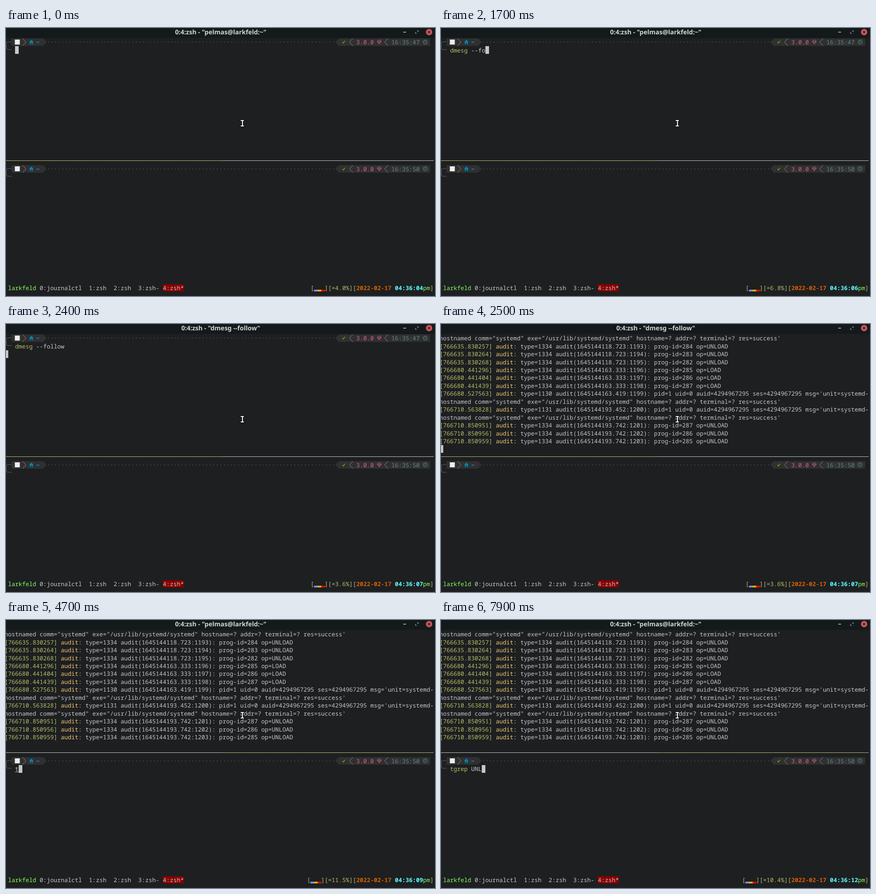
These frames come from a looping animation (947x591 px, 8 s). An HTML page with a canvas:

```html
<!DOCTYPE html>
<html lang="en">
<head>
<meta charset="utf-8">
<title>Terminal</title>
<style>
  html, body { margin: 0; width: 100%; height: 100%; overflow: hidden; background: #1d1f21; }
  canvas { display: block; width: 947px; height: 591px; }
</style>
</head>
<body>
<canvas id="stage" width="947" height="591"></canvas>
<script>
const ctx = document.getElementById('stage').getContext('2d');
const LOOP = 8000, W = 947, H = 591;
const CELL = 7.765, ROW = 17.47, LEFT = -3.3, TOP = 22.6;
const MONO = '12.94px "Noto Sans Mono", monospace';
const SANS = '14px "Noto Sans", sans-serif';
const BG = '#1d1f21', FG = '#c5c8c6', BAR = '#141a1b', SEG = '#303030';
const OLIVE = '#b5bd68', LIME = '#87ff5f', AMBER = '#f0c674', DIM = '#6c6c6c';
const HOST = 'larkfeld', HOME_TITLE = '"pelmas@larkfeld:~"';

// Each track: [start ms, value...]
const TOP_CMD = 'dmesg --follow', LOW_CMD = 'tgrep UNL';
const topTyped = [[0, 0], [300, 1], [400, 2], [500, 3], [600, 4], [700, 5], [800, 6], [1100, 7],
  [1400, 8], [1700, 10], [1900, 11], [2000, 12], [2200, 13], [2300, 14]];
const lowTyped = [[0, 0], [4700, 1], [4800, 2], [5200, 3], [5300, 5], [5400, 6], [7700, 7], [7900, 9]];
const stats = [[0, '4.0', 4], [100, '3.7', 5], [1100, '6.8', 6], [2100, '3.6', 7], [3200, '3.9', 8],
  [3800, '3.9', 9], [4200, '11.5', 9], [4800, '11.5', 10], [5300, '10.7', 10], [6300, '9.4', 11],
  [7300, '10.4', 12]];
const scenes = [[0, 'type'], [1200, 'flash'], [1300, 'type'], [2400, 'run'], [2500, 'log'],
  [3200, 'named'], [3800, 'low']];

const tail = 'hostnamed comm="systemd" exe="/usr/lib/systemd/systemd" hostname=? addr=? terminal=? res=success\'';
const unit = "pid=1 uid=0 auid=4294967295 ses=4294967295 msg='unit=systemd-";
const prog = (id, op) => `prog-id=${id} op=${op}`;
const log = [
  tail,
  ['766635.830257', 1334, '118.723:1193', prog(284, 'UNLOAD')],
  ['766635.830264', 1334, '118.723:1194', prog(283, 'UNLOAD')],
  ['766635.830268', 1334, '118.723:1195', prog(282, 'UNLOAD')],
  ['766680.441296', 1334, '163.333:1196', prog(285, 'LOAD')],
  ['766680.441404', 1334, '163.333:1197', prog(286, 'LOAD')],
  ['766680.441439', 1334, '163.333:1198', prog(287, 'LOAD')],
  ['766680.527563', 1130, '163.419:1199', unit],
  tail,
  ['766710.563828', 1131, '193.452:1200', unit],
  tail,
  ['766710.850951', 1334, '193.742:1201', prog(287, 'UNLOAD')],
  ['766710.850956', 1334, '193.742:1202', prog(286, 'UNLOAD')],
  ['766710.850959', 1334, '193.742:1203', prog(285, 'UNLOAD')]
];

const at = (track, t) => track.findLast(step => step[0] <= t);
const colX = c => LEFT + c * CELL;
const rowY = r => TOP + r * ROW;

function rect(x, y, w, h, color) {
  ctx.fillStyle = color;
  ctx.fillRect(x, y, w, h);
}

function poly(points, color, stroke, close) {
  ctx.beginPath();
  points.forEach(([x, y]) => ctx.lineTo(x, y));
  if (close) ctx.closePath();
  if (stroke) {
    ctx.strokeStyle = color;
    ctx.lineWidth = stroke;
    ctx.stroke();
  } else {
    ctx.fillStyle = color;
    ctx.fill();
  }
}

// Writes on the character grid and returns the next column.
function put(col, row, text, color = FG, bold = false) {
  ctx.font = (bold ? 'bold ' : '') + MONO;
  ctx.fillStyle = color;
  [...text].forEach((ch, i) => {
    if (ch !== ' ') ctx.fillText(ch, colX(col + i), rowY(row) + 13.5);
  });
  return col + text.length;
}

function label(text, x, y, color, bold = false, align = 'left') {
  ctx.font = (bold ? 'bold ' : '') + SANS;
  ctx.fillStyle = color;
  ctx.textAlign = align;
  ctx.fillText(text, x, y);
  ctx.textAlign = 'left';
}

function cursor(col, row) {
  rect(Math.round(colX(col)), Math.round(rowY(row)), 8, 17, FG);
}

function house(x, y, s, color) {
  poly([[x, y + s * .5], [x + s * .5, y], [x + s, y + s * .5], [x + s * .84, y + s * .5],
    [x + s * .84, y + s], [x + s * .6, y + s], [x + s * .6, y + s * .65], [x + s * .4, y + s * .65],
    [x + s * .4, y + s], [x + s * .16, y + s], [x + s * .16, y + s * .5]], color);
}

function titleBar(title) {
  rect(0, 0, W, 22, BAR);
  label(title, 474, 14, '#d0d5d5', true, 'center');
  rect(877, 8.5, 6, 1.5, '#c3c9c9');
  poly([[907, 6], [910, 6], [910, 9]], '#9ba3a3', 1.2);
  poly([[904, 9], [904, 12], [907, 12]], '#9ba3a3', 1.2);
  ctx.beginPath();
  ctx.arc(934, 9, 7, 0, 7);
  ctx.fillStyle = '#cc575d';
  ctx.fill();
  poly([[931.5, 6.5], [936.5, 11.5]], '#2a1618', 1.4);
  poly([[936.5, 6.5], [931.5, 11.5]], '#2a1618', 1.4);
}

function prompt(row, clock) {
  const y = rowY(row) + .4, mid = y + 8, end = y + 16.4;
  ctx.strokeStyle = '#626262';
  ctx.lineWidth = 1;
  ctx.beginPath();
  ctx.moveTo(12.5, mid - .5);
  ctx.arcTo(.6, mid - .5, .6, mid + 8, 4);
  ctx.arcTo(.6, mid + 16.5, 12.5, mid + 16.5, 4);
  ctx.lineTo(12.5, mid + 16.5);
  ctx.stroke();

  poly([[12.3, y], [82, y], [90, mid], [82, end], [12.3, end]], SEG);
  rect(19.5, mid - 5.5, 11, 11, '#eeeeee');
  poly([[36.5, y], [44, mid], [36.5, end]], '#8a8a8a', 1);
  house(51, mid - 5, 10, '#0087af');
  put(9, row, '~', '#00afff', true);
  for (let c = 12; c < 94; c++) rect(colX(c) + 3.2, mid - .6, 1.4, 1.4, DIM);

  poly([[727, mid], [734.5, y], [936.3, y], [936.3, end], [734.5, end]], SEG);
  ctx.font = '11px "DejaVu Sans", sans-serif';
  ctx.fillStyle = '#5faf00';
  ctx.fillText('✔', 741.5, mid + 4.3);
  [757.7, 835.3].forEach(x => poly([[x + 8, y], [x + .5, mid], [x + 8, end]], '#8a8a8a', 1));
  put(100, row, '3.0.0', '#d75f87');
  const gem = '#d75f87';
  poly([[821.5, mid - 4], [826.5, mid - 4], [828.5, mid - 1], [824, mid + 4], [819.5, mid - 1]], gem, 1, true);
  poly([[819.5, mid - 1], [828.5, mid - 1]], gem, .8);
  poly([[822, mid - 1], [824, mid + 4], [826, mid - 1]], gem, .7);
  put(110, row, clock, '#5f8787');
  ctx.strokeStyle = '#5f8787';
  ctx.lineWidth = 1.2;
  ctx.beginPath();
  ctx.arc(925.3, mid, 4.3, 0, 7);
  ctx.stroke();
  poly([[925.3, mid - 2.5], [925.3, mid + .5], [923.2, mid + .5]], '#5f8787', 1);
}

function command(row, text, word) {
  const head = text.slice(0, word);
  const col = put(3, row, head, head.length === word ? OLIVE : FG);
  if (text.length === 1) rect(colX(3), rowY(row) + 15, CELL, 1, FG);
  return put(col, row, text.slice(word));
}

function journal() {
  log.forEach((line, row) => {
    if (line === tail) return put(0, row, tail);
    const [stamp, type, id, rest] = line;
    let col = put(0, row, `[${stamp}] `, OLIVE);
    col = put(col, row, 'audit: ', AMBER);
    put(col, row, `type=${type} audit(1645144${id}): ${rest}`);
  });
}

// Ragged lower edges of the flash: [x, y] steps.
const upper = [[0, 78], [30, 85], [46, 77], [77, 86], [107, 90], [116, 94], [123, 96], [138, 93], [170, 96],
  [185, 94], [325, 104], [355, 116], [372, 105], [420, 109], [450, 107], [480, 101], [495, 108],
  [512, 101], [543, 108], [558, 101], [574, 128], [590, 136], [605, 130], [620, 134], [636, 130],
  [651, 138], [668, 133], [682, 138], [697, 130], [713, 135], [760, 128], [822, 162], [884, 160], [900, 163]];
const lower = [[574, 248], [590, 254], [620, 244], [636, 255], [651, 247], [667, 252], [697, 259],
  [715, 250], [745, 255], [760, 240], [775, 248], [803, 240], [822, 285], [852, 280], [868, 287], [884, 283]];

function flash() {
  ctx.save();
  ctx.beginPath();
  const steps = (edge, y0) => edge.forEach(([x, y], i) =>
    ctx.rect(x, y0, (edge[i + 1] || [W])[0] - x, y - y0));
  steps(upper, 0);
  steps(lower, 240);
  ctx.clip();
  rect(0, 0, W, 292, '#242424');
  rect(0, 0, 263, 120, '#1c2629');
  label('5.0 kB', 153, 28, '#889191');
  rect(0, 0, 263, 22, '#11191c');
  rect(0, 28, 263, 1, '#151e20');
  rect(0, 69, 158, 40, '#2b393b');
  rect(158, 69, 105, 40, '#1f282a');
  rect(263, 0, 8, 120, '#303030');
  poly([[8, 49], [-2, 49]], '#c3cccc', 1.6);
  poly([[3, 44.5], [-1.5, 49], [3, 53.5]], '#c3cccc', 1.6);
  poly([[30, 49], [41, 49]], '#6d7979', 1.6);
  poly([[36.5, 44.5], [41, 49], [36.5, 53.5]], '#6d7979', 1.6);
  house(65, 43, 13, '#c3cccc');
  label('Home', 86, 54, '#bac4c4');
  label('src', 152, 54, '#bac4c4');
  label('tgrep', 195, 54, '#bac4c4');
  poly([[242, 47], [252, 47], [247, 52.5]], '#c3cccc');
  rect(183, 60, 76, 2, '#2eb398');
  label('Name', 165, 87, '#bac4c4', true);
  ctx.restore();
}

function status(name, load, sec) {
  const row = 31;
  put(1, row, HOST, LIME);
  put(10, row, '0:journalctl  1:zsh  2:zsh  3:zsh-');
  const tab = `4:${name}*`;
  rect(346, 565, tab.length * CELL, 16, '#870000');
  put(45, row, tab);
  let col = 122 - 31 - load.length - 1;
  put(col, row, '[', OLIVE);
  ['#8787ff', '#d7af00', '#ff0000'].forEach((color, i) =>
    rect(Math.round(colX(col + 1 + i)), 577, 8, 4, color));
  col = put(col + 4, row, `][=${load}%][`, OLIVE);
  col = put(col, row, '2022-02-17 ', '#d75f00', true);
  col = put(col, row, '04:36:' + String(sec).padStart(2, '0'), '#5fffff', true);
  col = put(col, row, 'pm', LIME);
  put(col, row, ']', OLIVE);
}

function pointer() {
  const beam = [[518, 203, 7, 2], [518, 215, 7, 2], [521, 204, 2, 12]];
  beam.forEach(([x, y, w, h]) => rect(x - 1, y - 1, w + 2, h + 2, '#101010'));
  beam.forEach(([x, y, w, h]) => rect(x, y, w, h, '#ffffff'));
}

function draw(scene, topLen, lowLen, load, sec) {
  const low = scene === 'low', logged = low || scene === 'log' || scene === 'named';
  const name = scene === 'named' ? 'dmesg' : 'zsh';
  const busy = scene === 'run' || (logged && !low);
  rect(0, 0, W, H, BG);
  if (scene === 'flash') flash();
  else {
    titleBar(`0:4:${name} - ${busy ? `"${TOP_CMD}"` : HOME_TITLE}`);
    if (logged) {
      journal();
      if (!low) cursor(0, 14);
    } else {
      prompt(0, '16:35:47');
      const col = command(1, TOP_CMD.slice(0, topLen), 5);
      if (busy) cursor(0, 2);
      else cursor(col, 1);
    }
  }
  rect(0, 292, 478, 1, low ? FG : OLIVE);
  rect(478, 292, 466, 1, low ? OLIVE : FG);
  prompt(16, '16:35:50');
  const col = command(17, LOW_CMD.slice(0, lowLen), 5);
  if (low) cursor(col, 17);
  status(name, load, sec);
  pointer();
}

ctx.textRendering = 'geometricPrecision';
const start = performance.now();
let last = '';

function tick() {
  const t = (performance.now() - start) % LOOP;
  const state = [at(scenes, t)[1], at(topTyped, t)[1], at(lowTyped, t)[1], ...at(stats, t).slice(1)];
  const key = state.join();
  if (key !== last) draw(...state);
  last = key;
  requestAnimationFrame(tick);
}
tick();
</script>
</body>
</html>
```
